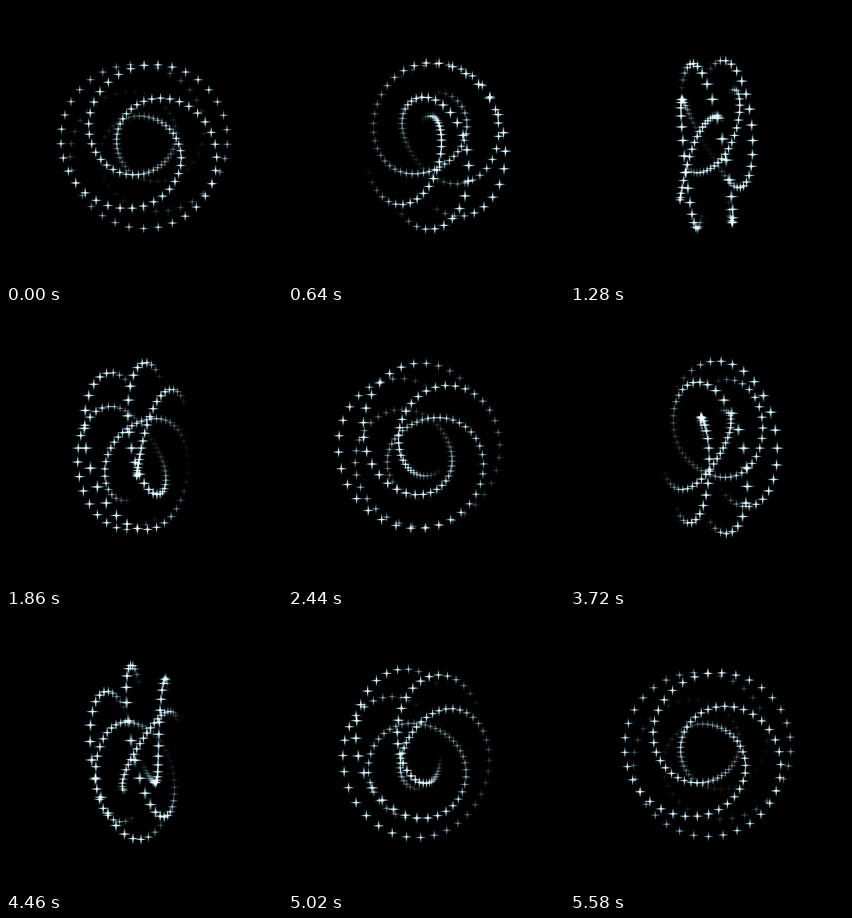
These frames come from a looping animation (540x540 px, 5.6 s). An HTML page with a canvas:

```html
<!DOCTYPE html>
<html lang="en">
<head>
<meta charset="utf-8">
<title>Star knot</title>
<style>
  html, body { margin: 0; width: 100%; height: 100%; overflow: hidden; background: #000; }
  canvas { display: block; width: 540px; height: 540px; }
</style>
</head>
<body>
<canvas id="stage" width="540" height="540"></canvas>
<script>
const ctx = document.getElementById('stage').getContext('2d');

const TAU = Math.PI * 2;
const LOOP = 5600, STEP = 20;
const CENTER = 270, FOCAL = 500;
const STARS = 180, SLIDE = 12;      // stars passed along the knot per loop
const RING = 108, TUBE = 54.5;
const TURNS = 5, COILS = 3;
const SHUTTER = 18;                 // ms the shutter stays open after each step
const FAR = -61, NEAR = 45;         // depths where stars fade out / are full

function starPath(arm, waist) {
  const path = new Path2D();
  for (let k = 0; k < 8; k++) {
    const a = k * TAU / 8;
    const d = k % 2 ? waist * Math.SQRT2 : arm;
    path.lineTo(d * Math.cos(a), d * Math.sin(a));
  }
  path.closePath();
  return path;
}

function radial(radius, stops) {
  const g = ctx.createRadialGradient(0, 0, 0, 0, 0, radius);
  stops.forEach(([at, color]) => g.addColorStop(at, color));
  return g;
}

const core = starPath(10.5, 0.9);
const halo = starPath(9.5, 1.7);
const coreFill = radial(10.5, [[0, '#f4fbff'], [0.4, '#d3eaf3'], [1, '#a3cbdb']]);
const haloFill = radial(9.5, [[0, 'rgba(110,170,195,.5)'], [1, 'rgba(60,125,150,.3)']]);

// Screen place, scale and depth of one star at time t
function place(i, t) {
  const p = t / LOOP;
  const s = (i - SLIDE * p) / STARS * TAU;
  const rho = RING + TUBE * Math.cos(COILS * s);
  const x = rho * Math.cos(TURNS * s);
  const y = -rho * Math.sin(TURNS * s);
  const z = TUBE * Math.sin(COILS * s);
  const c = Math.cos(p * TAU), n = Math.sin(p * TAU);
  const depth = z * c + x * n;
  const scale = FOCAL / (FOCAL - depth);
  return { x: CENTER + (x * c - z * n) * scale, y: CENTER + y * scale, scale, depth };
}

function drawStar(i, t) {
  const a = place(i, t), b = place(i, t + SHUTTER);
  const depth = (a.depth + b.depth) / 2;
  const alpha = Math.min(1, (depth - FAR) / (NEAR - FAR));
  if (alpha <= 0) return;
  const n = Math.max(1, Math.ceil(Math.hypot(b.x - a.x, b.y - a.y)));
  ctx.globalAlpha = alpha / n;
  for (let k = 0; k < n; k++) {
    const u = (k + 0.5) / n;
    const x = a.x + (b.x - a.x) * u, y = a.y + (b.y - a.y) * u;
    ctx.setTransform(a.scale, 0, 0, a.scale, x, y);
    ctx.fillStyle = haloFill;
    ctx.fill(halo);
    ctx.fillStyle = coreFill;
    ctx.fill(core);
  }
}

function draw(t) {
  ctx.setTransform(1, 0, 0, 1, 0, 0);
  ctx.globalAlpha = 1;
  ctx.globalCompositeOperation = 'source-over';
  ctx.fillStyle = '#000';
  ctx.fillRect(0, 0, 540, 540);
  ctx.globalCompositeOperation = 'lighter';
  for (let i = 0; i < STARS; i++) drawStar(i, t);
}

let start = null;
function tick(now) {
  if (start === null) start = now;
  const t = Math.max(0, now - start) % LOOP;
  draw(Math.floor(t / STEP) * STEP);
  requestAnimationFrame(tick);
}
draw(0);
requestAnimationFrame(tick);
</script>
</body>
</html>
```
